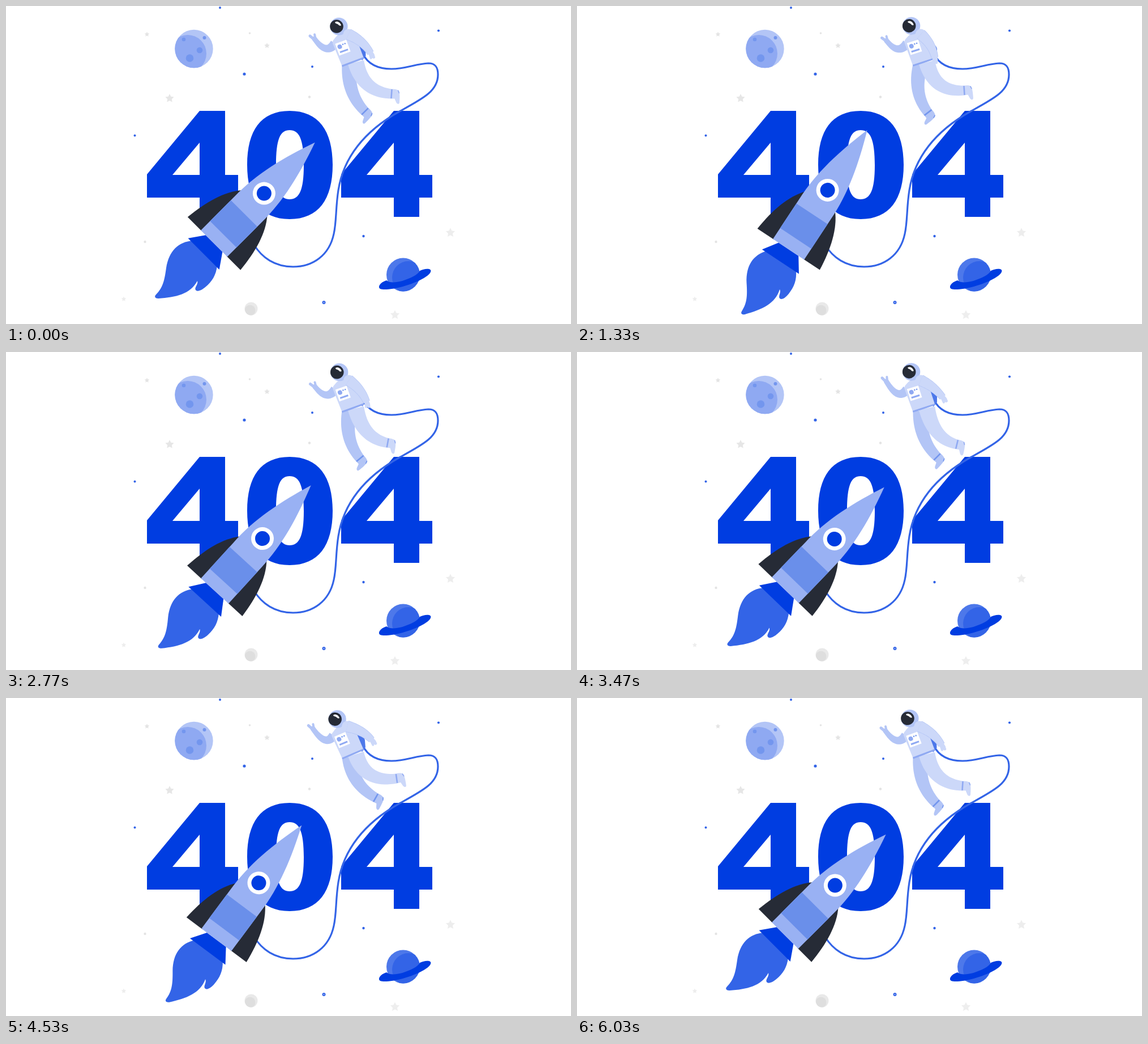
An HTML page with a canvas for the animation above (6070 ms loop, 998 by 561 pixels).

```html
<!DOCTYPE html>
<html lang="en">
<head>
<meta charset="utf-8">
<title>404</title>
<style>
html, body { margin: 0; width: 100%; height: 100%; overflow: hidden; background: #fff; }
canvas { display: block; }
</style>
</head>
<body>
<canvas id="stage" width="998" height="561" role="img" aria-label="404"></canvas>
<script>
const ctx = document.getElementById('stage').getContext('2d');
const LOOP = 6070;
const BLUE = '#003de1', FLAME = '#3364e7', SOFT = '#4d78ea', BAND = '#6a8fea',
      CRATER = '#7396ee', SHADE = '#8fa9f2', BODY = '#99b1f3', MID = '#b3c5f6',
      LIGHT = '#ccd8f9', DARK = '#262b36', WHITE = '#fff';

// ---------- drawing helpers ----------
function fill(d, color) {
  ctx.fillStyle = color;
  ctx.fill(new Path2D(d), 'evenodd');
}
function stroke(d, color, width) {
  ctx.strokeStyle = color;
  ctx.lineWidth = width;
  ctx.stroke(new Path2D(d));
}
function disc(x, y, r, color) {
  ctx.fillStyle = color;
  ctx.beginPath();
  ctx.arc(x, y, r, 0, 7);
  ctx.fill();
}
function group(draw, x, y, angle) {
  ctx.save();
  ctx.translate(x, y);
  ctx.rotate(angle);
  draw();
  ctx.restore();
}
function turned(deg, x, y, draw) {
  group(() => { ctx.translate(-x, -y); draw(); }, x, y, deg * Math.PI / 180);
}
// A globe with a second disc clipped inside it
function globe(x, y, r, color, sx, sy, sr, shade) {
  disc(x, y, r, color);
  ctx.save();
  ctx.beginPath();
  ctx.arc(x, y, r, 0, 7);
  ctx.clip();
  disc(sx, sy, sr, shade);
  ctx.restore();
}
function star(x, y, r, color) {
  ctx.fillStyle = color;
  ctx.beginPath();
  for (let i = 0; i < 10; i++) {
    const a = i * Math.PI / 5 - Math.PI / 2, q = i % 2 ? r * 0.5 : r;
    ctx.lineTo(x + q * Math.cos(a), y + q * Math.sin(a));
  }
  ctx.fill();
}
// Tapered limb along a quadratic curve; returns the angle at its end
function limb(x0, y0, cx, cy, x1, y1, w0, w1, color) {
  const left = [], right = [];
  let angle = 0;
  for (let i = 0; i <= 20; i++) {
    const t = i / 20, s = 1 - t;
    const x = s * s * x0 + 2 * s * t * cx + t * t * x1;
    const y = s * s * y0 + 2 * s * t * cy + t * t * y1;
    angle = Math.atan2(s * (cy - y0) + t * (y1 - cy), s * (cx - x0) + t * (x1 - cx));
    const w = (w0 * s + w1 * t) / 2, nx = -Math.sin(angle) * w, ny = Math.cos(angle) * w;
    left.push([x + nx, y + ny]);
    right.unshift([x - nx, y - ny]);
  }
  ctx.fillStyle = color;
  ctx.beginPath();
  for (const p of left.concat(right)) ctx.lineTo(...p);
  ctx.fill();
  return angle;
}

// ---------- timing ----------
// Smooth looping curve through keys, flat at every peak and valley
function curve(ts, vs, t) {
  const n = ts.length;
  const T = i => ts[(i + n) % n] + LOOP * Math.floor(i / n);
  const V = i => vs[(i + n) % n];
  const rise = i => (V(i + 1) - V(i)) / (T(i + 1) - T(i));
  const slope = i => {
    const a = rise(i - 1), b = rise(i);
    return a * b > 0 ? 2 * a * b / (a + b) : 0;
  };
  let k = n - 1;
  while (ts[k] > t) k--;
  const h = T(k + 1) - T(k), u = (t - T(k)) / h, r = 1 - u;
  return r * r * (1 + 2 * u) * V(k) + u * u * (3 - 2 * u) * V(k + 1)
    + h * u * r * (r * slope(k) - u * slope(k + 1));
}
const POSE = [0, 1330, 2130, 3470, 4530, 5430];
const SWING = [[0, 1250, 3300, 4800], [0, 11.6, 0.8, 9]];

// ---------- scenery ----------
const four = 'M342 185H387V298H410V338H387V372H342V338H249V297ZM294 298H342V241Z';
const zero = 'M501 185C552 185 577 220 577 280C577 341 552 376 501 376C450 376 426 341 426 280' +
  'C426 220 450 185 501 185ZM501 219C518 219 526 235 526 281C526 325 518 341 501 341' +
  'C484 341 477 325 477 281C477 235 484 219 501 219Z';
const rope = 'M630 84C640 104 660 111 681 111C706 111 724 102 746 101C760 101 763 110 763 121' +
  'C763 150 737 163 695 186C640 217 597 262 587 325C582 357 584 380 579 402' +
  'C571 440 542 460 507 460C475 460 452 444 438 421';
const ring = 'M672 484C660 488 656 496 661 499C672 503 712 495 738 480C752 472 753 465 747 464' +
  'C742 463 736 465 731 467C728 474 715 480 700 485C688 488 678 489 672 484Z';

function scenery() {
  [[249, 50, 4.5, '#e4e4e4'], [461, 70, 5, '#e4e4e4'], [289, 163, 8, '#e6e6e6'],
   [785, 400, 8.5, '#ededed'], [208, 517, 4.5, '#ededed'], [687, 545, 8.5, '#eeeeee']]
    .forEach(s => star(...s));
  [[430.5, 48, 1.8], [536, 160.5, 2.2], [245.5, 416, 2.2]].forEach(d => disc(...d, '#e4e4e4'));
  [[378, 3, 2], [421, 120, 2.6], [541, 107, 2], [764, 43.5, 2.1], [227.5, 228.5, 2],
   [631.5, 406, 2.2], [561.5, 523, 3]].forEach(d => disc(...d, FLAME));
  disc(561.5, 523, 1, MID);

  globe(332, 75.5, 33.7, MID, 321, 84, 33, SHADE);
  [[314, 59, 3.3], [350.5, 56, 3], [342, 78, 5.3], [324.5, 92, 6.8]]
    .forEach(c => disc(...c, CRATER));
  globe(433, 534, 11.5, '#e9e9e9', 431, 537, 9.5, '#dedede');
  globe(701.5, 474, 29.5, SOFT, 711, 479, 29, FLAME);
  fill(ring, BLUE);

  fill(four, BLUE);
  fill(zero, BLUE);
  ctx.save();
  ctx.translate(343, 0);
  fill(four, BLUE);
  ctx.restore();
  stroke(rope, FLAME, 3.2);
}

// ---------- rocket ----------
const flame = 'M330 414C304 416 288 432 283 462C280 484 277 497 265 509C261 513 264 516 269 516' +
  'C300 514 326 508 338 485C340 491 332 497 335 501C338 505 346 501 352 496' +
  'C364 486 371 475 373 458Z';
const fin = 'M-66 0C-62 -42 -52 -78 -31 -102V0Z';

function rocket(t) {
  turned(-curve(...SWING, t), 421, 393.4, () => {
    fill(flame, FLAME);
    group(() => {
      fill('M-21 0H21L39 26H-39Z', BLUE);
      fill(fin, DARK);
      ctx.scale(-1, 1);
      fill(fin, DARK);
      fill('M-33 0V-85C-34 -140 -20 -195 0 -252C20 -195 34 -140 33 -85V0Z', BODY);
      fill('M-33 -23V-75H33V-23Z', BAND);
      disc(0, -125, 20, WHITE);
      disc(0, -125, 13, BLUE);
    }, 367.5, 419, Math.PI / 4);
  });
}

// ---------- astronaut ----------
function leg(hx, hy, cx, cy, ax, ay, width, color, cuff) {
  const angle = limb(hx, hy, cx, cy, ax, ay, width, 17, color);
  group(() => {
    fill('M-1 -8.5C4 -9 10 -9 13 -6C15 0 15 8 15 14C15 18 11 18 9 14L6 8L-1 8.5Z', color);
    stroke('M0 -8V8', cuff, 2.6);
    stroke('M11 -7L13.5 -2', cuff, 1.5);
  }, ax, ay, angle);
}

function astronaut(t) {
  const at = (...vs) => curve(POSE, vs, t);
  const lean = at(0, 2.4, -0.8, 2.4, -2.6, -0.8);
  const shift = lean * 0.9;
  const torso = draw => turned(lean, 612, 99, draw);
  ctx.lineCap = 'butt';

  torso(() => fill('M616 62L630 68Q634 70 635 75L635.5 88L629 96Z', SOFT));

  const wx = at(548, 550, 549, 549, 545, 547), wy = at(62, 65, 73, 56, 58, 61);
  const far = limb(581 + shift, 66, 567 + shift / 2, 86, wx, wy, 17, 9, MID);
  group(() => {
    ctx.lineCap = 'round';
    stroke('M0 0L5 0', MID, 9);
    stroke('M5 -1L14 -3', MID, 5);
    stroke('M5 2L11 5', MID, 4);
  }, wx, wy, far);
  ctx.lineCap = 'butt';

  leg(607, 104, at(601.5, 592.5, 592.5, 603.5, 610, 602.5), at(153, 152, 152, 153, 152, 154),
    at(634, 620, 620, 636, 653, 640), at(186, 188, 189, 185, 176, 184), 27, MID, CRATER);
  leg(618, 99, at(630, 630.5, 630, 629, 633.5, 630), at(151.5, 152.5, 151, 153, 150, 152),
    at(681, 684, 679, 671, 690, 685), at(155, 149, 156, 163, 142, 150), 29, LIGHT, SHADE);

  torso(() => {
    fill('M580 58C584 52 592 46 602 42C612 42 616 50 620 60L632 92L594 107L577 66Q576 62 580 58Z', LIGHT);
    stroke('M593.5 106L632 91.5', SHADE, 3);
    disc(588, 36, 15.6, MID);
    disc(584, 36, 11.8, DARK);
    fill('M581 29C584 26 590 28 592 34C590 36 588 34 586 32C584 31 582 31 581 29Z', WHITE);
    group(() => {
      fill('M-10.5 -11H10.5V11H-10.5Z', WHITE);
      disc(-4.5, -3.5, 4, SHADE);
      disc(2, -5.5, 1.3, CRATER);
      disc(6, -5.5, 1.3, CRATER);
      stroke('M-7.5 6H7.5', SHADE, 3);
    }, 595, 73.5, -0.35);
  });

  const hx = at(644, 632, 629, 646, 646, 645), hy = at(83, 91, 93, 80, 74, 81);
  const cx = at(631, 627.5, 626.5, 630.5, 631, 629), cy = at(61.5, 67, 69, 60.5, 57, 60);
  const sx = 605 + shift, sy = 50;
  disc(sx, sy, 9.5, LIGHT);
  // A slightly darker underlay separates the arm from the suit
  limb(sx, sy, cx, cy, hx, hy, 20.4, 12.4, MID);
  const near = limb(sx, sy, cx, cy, hx, hy, 19, 11, LIGHT);
  group(() => {
    ctx.lineCap = 'round';
    stroke('M0 0L5 0', LIGHT, 9);
    stroke('M5 -1.5L9 -1', LIGHT, 5);
    stroke('M4 3L8 4', LIGHT, 4);
  }, hx, hy, near);
}

function frame(now) {
  const t = now % LOOP;
  ctx.fillStyle = WHITE;
  ctx.fillRect(0, 0, 998, 561);
  scenery();
  rocket(t);
  astronaut(t);
  requestAnimationFrame(frame);
}
const start = performance.now();
frame(0);
function tick() {
  frame = null;
}
</script>
</body>
</html>
```
